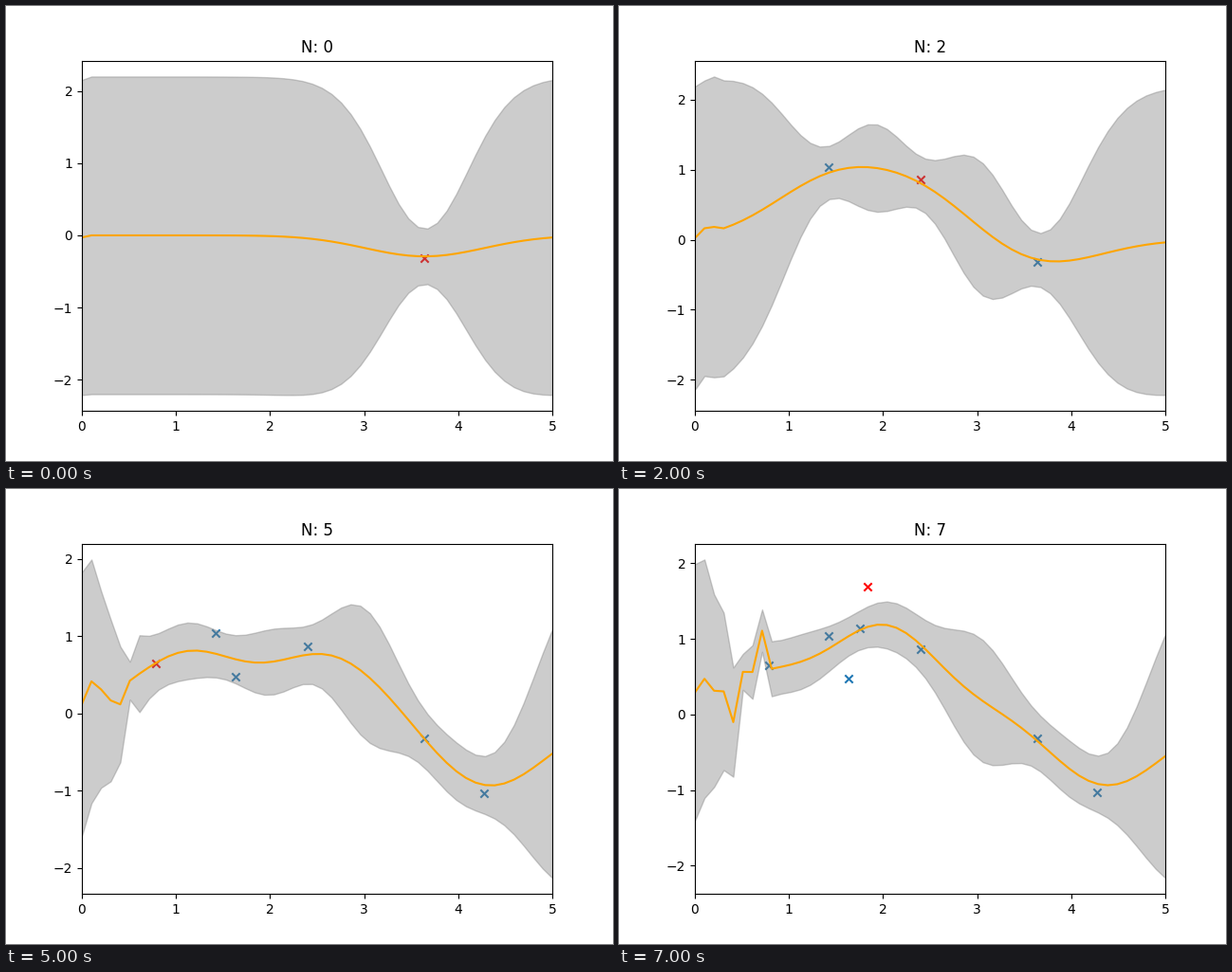
A matplotlib script for the animation above (8 s loop, 640 by 480 pixels).

```python
import numpy as np
import matplotlib.pyplot as plt
from matplotlib.animation import FuncAnimation

NOISE = 0.1
LENGTH_SQ = 0.4

# Observations in the order in which they arrive
X = np.array([3.644, 1.426, 2.404, 4.279, 1.638, 0.790, 1.759, 1.830])
Y = np.array([-0.32, 1.037, 0.868, -1.03, 0.471, 0.652, 1.135, 1.687])
GRID = np.linspace(0, 5, 50)


def kernel(a, b):
    """RBF kernel; the noise sits on the main diagonal of any block."""
    sq_dist = (a[:, None] - b[None, :]) ** 2
    return np.exp(-0.5 * sq_dist / LENGTH_SQ) + NOISE * np.eye(len(a), len(b))


def posterior(x, y):
    cross = kernel(x, GRID)
    weights = np.linalg.solve(kernel(x, x), cross)
    mean = weights.T @ y
    var = 1 + NOISE - np.sum(cross * weights, axis=0)
    return mean, var


fig, ax = plt.subplots(figsize=(6.4, 4.8), dpi=100)


def draw(n):
    ax.clear()
    mean, var = posterior(X[:n + 1], Y[:n + 1])
    ax.scatter(X[:n], Y[:n], marker="x", color="tab:blue")
    ax.scatter(X[n], Y[n], marker="x", color="red")
    ax.fill_between(GRID, mean - 2 * var, mean + 2 * var,
                    color="gray", alpha=0.4)
    ax.plot(GRID, mean, color="orange")
    ax.set_xlim(0, 5)
    ax.set_title(f"N: {n}")
    return []


anim = FuncAnimation(fig, draw, frames=len(X), init_func=lambda: draw(0),
                     interval=1000, repeat=True, repeat_delay=0)
plt.show()
```
